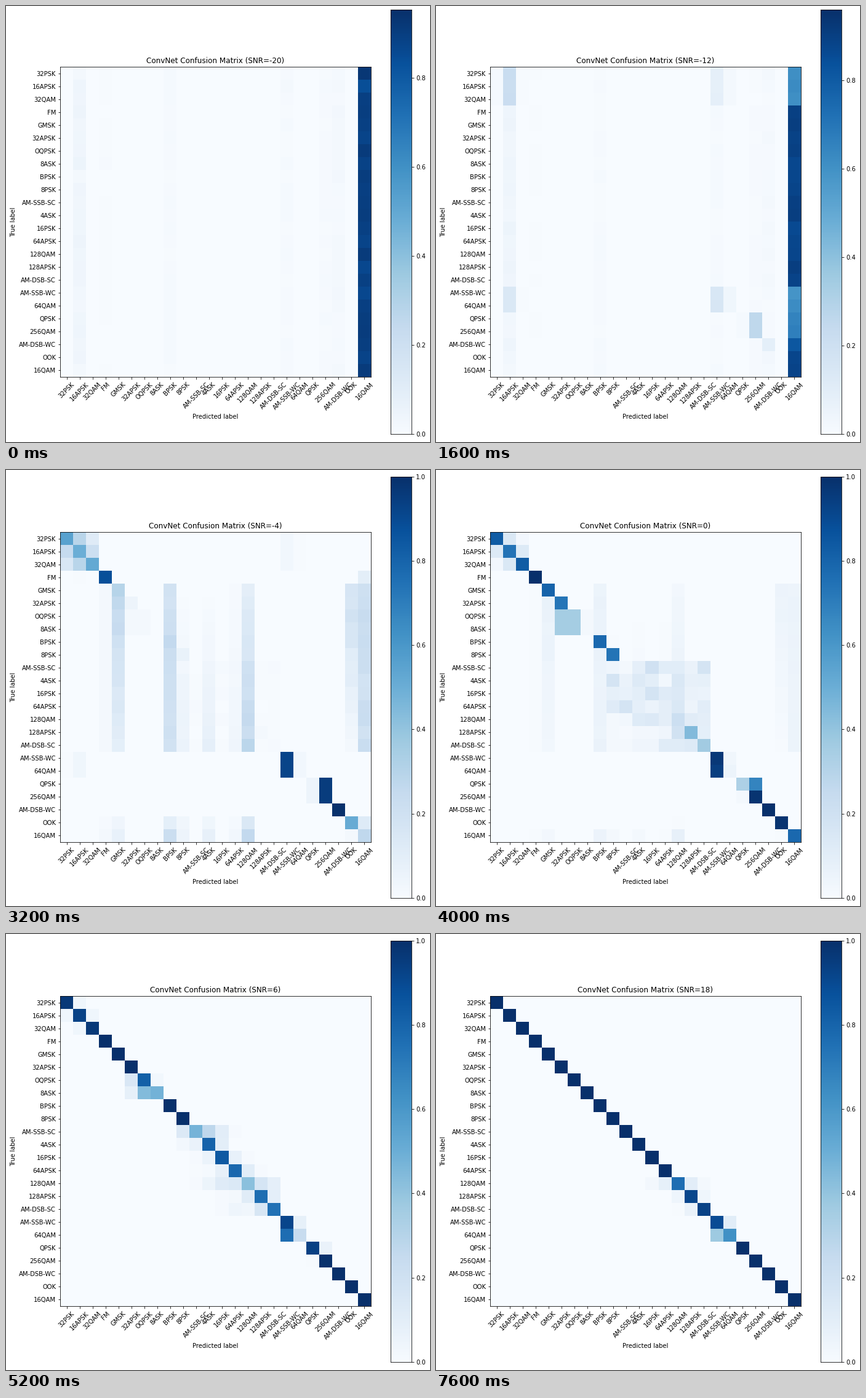
A matplotlib script for the animation above (8 s loop, 689 by 710 pixels).

```python
from itertools import chain

import numpy as np
import matplotlib.pyplot as plt
from matplotlib.animation import FuncAnimation

W, H, DPI = 689, 710, 72
FRAMES, INTERVAL = 20, 400
CLASSES = ("32PSK 16APSK 32QAM FM GMSK 32APSK OQPSK 8ASK BPSK 8PSK AM-SSB-SC 4ASK "
           "16PSK 64APSK 128QAM 128APSK AM-DSB-SC AM-SSB-WC 64QAM QPSK 256QAM "
           "AM-DSB-WC OOK 16QAM").split()
N = len(CLASSES)
LAST = N - 1
COLS = np.arange(N)

AMPLITUDE = range(0, 3)
SIDEBAND = range(17, 19)
DIGITAL = range(4, 17)

# SNR at which a row stops being a blind guess
ONSET = np.full(N, -1.0)
ONSET[:4] = ONSET[SIDEBAND] = -6
ONSET[19:21] = -11
ONSET[21] = -9.5
ONSET[22] = -4


def rise(snr, centre, width=1.0):
    return 1 / (1 + np.exp(-(snr - centre) / width))


def profile(weights):
    hits = np.zeros(N)
    hits[list(weights)] = list(weights.values())
    return hits


def idle_guess(rng):
    """Pure noise: nearly everything is taken for the last class."""
    faint = profile({1: 0.035, 3: 0.005, 8: 0.01, 17: 0.01, 20: 0.008, 21: 0.016})
    hits = faint * rng.uniform(0.5, 1.5, N)
    hits[LAST] = 1 - hits.sum() - rng.uniform(0, 0.05)
    return hits


def amplitude_guess(row, snr):
    split = rise(snr, -10)
    if row in AMPLITUDE:
        first, second, sideband = 0.28, 0.37, 0.24
    else:
        first, second, sideband = 0.05, 0.32, 0.45
    return profile({0: first * split, 1: second + first * (1 - split), 2: 0.02,
                    17: sideband, 18: sideband / 4})


def digital_guess(row, rng):
    """A few catch-all columns whose share drifts down the rows."""
    drift = lambda a, b: np.interp(row, (DIGITAL[0], DIGITAL[-1]), (a, b))
    hits = profile({3: 0.02, 4: drift(0.28, 0.09), 8: 0.22, 9: drift(0, 0.06),
                    11: drift(0, 0.08), 13: drift(0.01, 0.03), 14: drift(0.1, 0.27),
                    22: drift(0.21, 0.02), LAST: 0.21})
    return hits * rng.uniform(0.85, 1.15, N)


def blind(row, snr, rng):
    idle = idle_guess(rng)
    if row in AMPLITUDE or row in SIDEBAND:
        share, hits = rise(snr, -11, 1.3), amplitude_guess(row, snr)
    elif row in DIGITAL or row >= 22:
        share, hits = rise(snr, -6, 0.5), digital_guess(row, rng)
    else:
        return idle
    return idle + (hits - idle) * share


class Family:
    """Classes mistaken for their neighbours, less so as the SNR grows."""

    def __init__(self, rows, cols, lock, slope, favourite=0, pull=0, jitter=0):
        self.rows, self.cols = rows, cols
        self.lock, self.slope = lock, slope
        self.favourite, self.pull = favourite, pull
        self.noise = jitter * np.random.default_rng(7).normal(size=(N, N))

    def settled(self, row, snr):
        sharpness = self.slope * max(snr - self.lock, 0)
        pull = self.pull * np.clip(1 - (snr + 4) / 18, 0.2, 1)
        logit = (self.noise[row] - sharpness * abs(COLS - row)
                 - pull * abs(COLS - self.favourite))
        hits = np.where(np.isin(COLS, self.cols), np.exp(logit), 0)
        return hits / hits.sum()


FAMILIES = [
    Family(AMPLITUDE, range(0, 3), -7, 0.25),
    Family(range(6, 8), range(5, 8), 3.9, 0.8, favourite=5.5, pull=3.6),
    Family(range(10, 14), range(9, 17), 2.2, 0.5, jitter=0.5),
    Family(range(14, 17), range(9, 17), -6, 0.09, jitter=0.5),
    Family(SIDEBAND, range(17, 19), -4, 0.06, favourite=17, pull=4),
    Family(range(19, 21), range(19, 21), -4, 0.4, favourite=20, pull=3),
]
FAMILY_OF = dict(chain.from_iterable(((r, f) for r in f.rows) for f in FAMILIES))


def confusion(snr):
    rng = np.random.default_rng(100 + snr)
    m = np.eye(N)
    for row in range(N):
        if row in FAMILY_OF:
            m[row] = FAMILY_OF[row].settled(row, snr)
        guess = blind(row, snr, rng)
        m[row] = guess + (m[row] - guess) * rise(snr, ONSET[row])
    return m


def place(ax, left, top, right, bottom):
    ax.set_position([left / W, 1 - bottom / H, (right - left) / W, (bottom - top) / H])


fig = plt.figure(figsize=(W / DPI, H / DPI), dpi=DPI, facecolor="white")
ax = fig.add_axes([0.1, 0.1, 0.7, 0.7])
cax = fig.add_axes([0.9, 0.1, 0.05, 0.8])

heat = ax.imshow(np.zeros((N, N)), cmap="Blues", interpolation="nearest", aspect="auto")
ax.set_xticks(COLS, CLASSES, rotation=45)
ax.set_yticks(COLS, CLASSES)
ax.set_xlabel("Predicted label")
ax.set_ylabel("True label")
title = ax.set_title("")

bar = cax.imshow(np.arange(256)[:, None], cmap="Blues", origin="lower",
                 interpolation="nearest", aspect="auto", extent=(0, 1, 0, 1))
cax.set_xticks([])
cax.yaxis.tick_right()
ticks = np.arange(6) / 5
cax.set_yticks(ticks, [f"{v:.1f}" for v in ticks])


def update(i):
    snr = 2 * i - 20
    low = snr < -4
    peak = 0.953 + 0.007 * min(i / 4, 1) if low else 1.0
    top = 99 if low else 101
    place(ax, 88, top, 593, top + 505)
    place(cax, 625, 6 if low else 10.7, 659, 697)
    heat.set_data(confusion(snr))
    heat.set_clim(0, peak)
    bar.set_extent((0, 1, 0, peak))
    cax.set_ylim(0, peak)
    title.set_text(f"ConvNet Confusion Matrix (SNR={snr})")
    return heat, bar, title


anim = FuncAnimation(fig, update, frames=FRAMES, interval=INTERVAL, repeat=True,
                     repeat_delay=0, blit=False)
plt.show()
```
